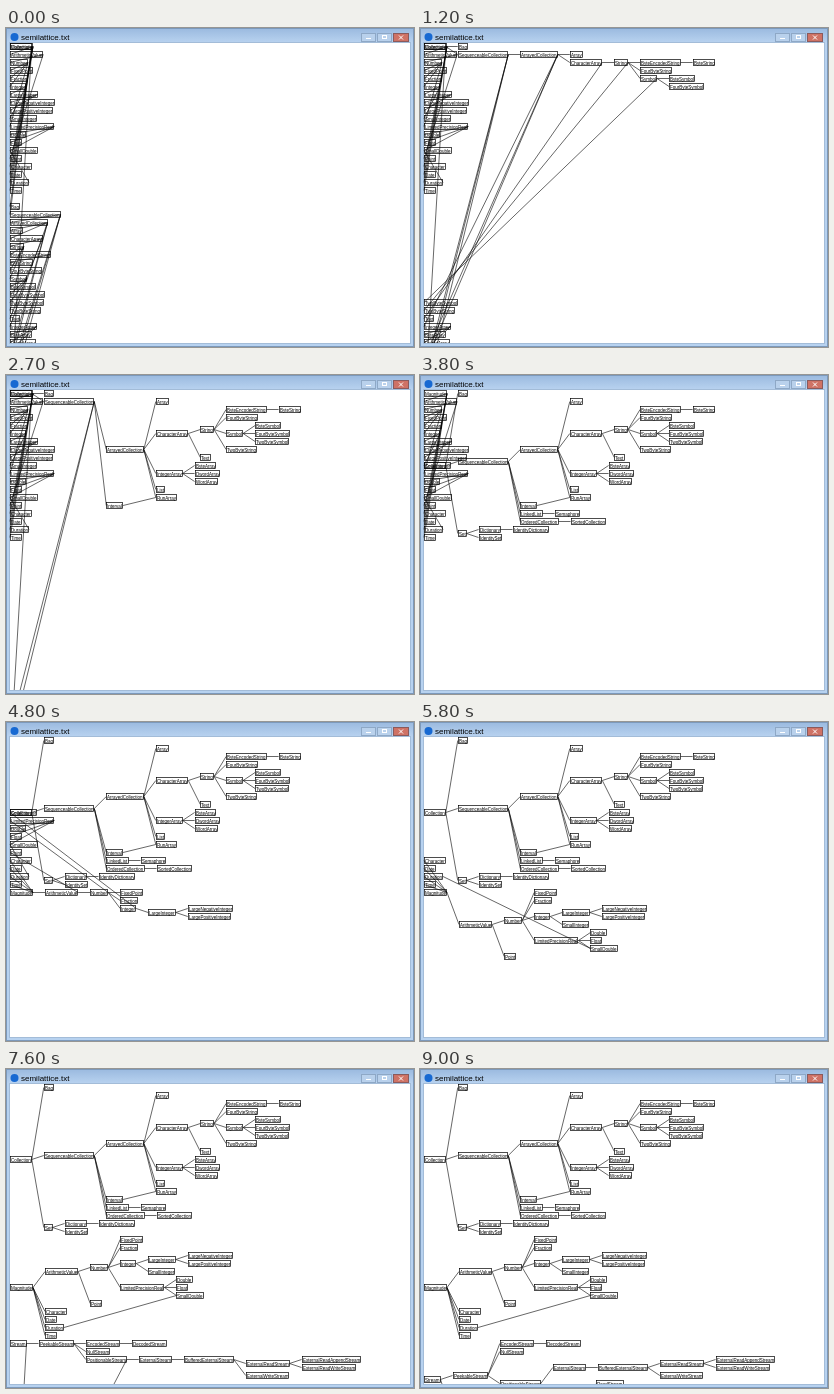
An HTML page with a canvas that plays this animation: 408 by 319 pixels, repeating every 9200 ms.

```html
<!DOCTYPE html>
<html lang="en">
<head>
<meta charset="utf-8">
<title>semilattice.txt</title>
<style>
html, body { margin: 0; width: 100%; height: 100%; overflow: hidden; background: #fff; }
canvas { display: block; }
</style>
</head>
<body>
<canvas id="stage" width="408" height="319"></canvas>
<script>
const STEP = 100, LOOP = 9200, ROW = 8, GAP = 12, LEFT = 4, TOP = 18.5;
const TEXT_X = 0.045, TEXT_Y = 0.055; // condensed label scale for the 100px font
const LABEL_FONT = '100px "Liberation Sans", Arial, sans-serif';

const outline = `
Magnitude
 ArithmeticValue
  Number
   FixedPoint
   Fraction
   Integer
    LargeInteger
     LargeNegativeInteger
     LargePositiveInteger
    SmallInteger
   LimitedPrecisionReal
    Double
    Float
    SmallDouble
  Point
 Character
 Date
 Duration
 Time
Collection
 Bag
 SequenceableCollection
  ArrayedCollection
   Array
   CharacterArray
    String
     ByteEncodedString
      ByteString
     FourByteString
     Symbol
      ByteSymbol
      FourByteSymbol
      TwoByteSymbol
     TwoByteString
    Text
   IntegerArray
    ByteArray
    DwordArray
    WordArray
   List
   RunArray
  Interval
  LinkedList
   Semaphore
  OrderedCollection
   SortedCollection
 Set
  Dictionary
   IdentityDictionary
  IdentitySet
Stream
 PeekableStream
  EncodedStream
   DecodedStream
  NullStream
  PositionableStream
   ExternalStream
    BufferedExternalStream
     ExternalReadStream
      ExternalReadAppendStream
      ExternalReadWriteStream
     ExternalWriteStream
   InternalStream
    ReadStream
    WriteStream
     ByteCodeStream
     ReadWriteStream
     TextStream
 Random`;

const ctx = document.getElementById('stage').getContext('2d');
const nodes = [], roots = [], edges = [], moves = [];

function parse() {
  ctx.font = LABEL_FONT;
  const path = [];
  for (const line of outline.trim().split('\n')) {
    const name = line.trim(), depth = line.length - name.length;
    const node = { name, kids: [], w: ctx.measureText(name).width * TEXT_X + 2 };
    nodes.push(node);
    path[depth] = node;
    if (depth) {
      path[depth - 1].kids.push(node);
      edges.push([path[depth - 1], node]);
    } else roots.push(node);
  }
  const find = name => nodes.find(n => n.name === name);
  edges.push([find('Interval'), find('RunArray')], [find('Duration'), find('SmallDouble')]);
}

// Depth-first layout: place a node, then its kids, then centre it on its rows.
let row = TOP;
function place(node, x) {
  const top = row;
  moves.push([node, x, top]);
  node.kids.forEach((kid, i) => {
    if (i) row += ROW;
    place(kid, x + node.w + GAP);
  });
  if (row > top) moves.push([node, x, (top + row) / 2]);
}

function box(x, y, w, h, fill, stroke) {
  ctx.fillStyle = fill;
  ctx.fillRect(x, y, w, h);
  if (!stroke) return;
  ctx.strokeStyle = stroke;
  ctx.lineWidth = 1;
  ctx.strokeRect(x + 0.5, y + 0.5, w - 1, h - 1);
}

function drawWindow() {
  box(0, 0, 408, 319, '#b7d2f0', '#7c99bb');
  const bar = ctx.createLinearGradient(0, 1, 0, 15);
  bar.addColorStop(0, '#9cbbe0');
  bar.addColorStop(1, '#b9d3f0');
  box(1, 1, 406, 14, bar);
  box(3, 14, 402, 302, '#a3bcd8');
  box(4, 15, 400, 300, '#fff');

  ctx.fillStyle = '#1769d2';
  ctx.beginPath();
  ctx.arc(8.5, 9, 4, 0, 7);
  ctx.fill();
  ctx.fillStyle = '#000';
  ctx.font = '8px "Liberation Sans", Arial, sans-serif';
  ctx.fillText('semilattice.txt', 15, 12);

  box(355, 5, 15, 9, '#b9d1ec', '#8ea8c6');
  box(371, 5, 15, 9, '#b9d1ec', '#8ea8c6');
  box(387, 5, 16, 9, '#cf7265', '#8a5a5c');
  box(360, 10, 5, 1, '#fff');
  ctx.strokeStyle = '#fff';
  ctx.strokeRect(376.5, 7.5, 4, 3);
  ctx.beginPath();
  ctx.moveTo(393, 7.5);
  ctx.lineTo(397, 11.5);
  ctx.moveTo(397, 7.5);
  ctx.lineTo(393, 11.5);
  ctx.stroke();
}

function drawNode({ name, x, y, w }) {
  const left = Math.round(x);
  ctx.strokeRect(left + 0.5, y - 3, Math.round(x + w) - left - 1, 6);
  ctx.save();
  ctx.translate(left + 1, y + 2);
  ctx.scale(TEXT_X, TEXT_Y);
  ctx.fillText(name, 0, 0);
  ctx.restore();
}

function draw(step) {
  nodes.forEach((n, i) => { n.x = LEFT; n.y = TOP + i * ROW; });
  for (const [node, x, y] of moves.slice(0, step + 1)) Object.assign(node, { x, y });

  drawWindow();
  ctx.save();
  ctx.beginPath();
  ctx.rect(3, 15, 402, 300);
  ctx.clip();
  ctx.strokeStyle = ctx.fillStyle = '#000';
  ctx.font = LABEL_FONT;
  ctx.lineWidth = 0.6;
  ctx.beginPath();
  for (const [a, b] of edges) {
    ctx.moveTo(a.x + a.w, a.y);
    ctx.lineTo(b.x, b.y);
  }
  ctx.stroke();
  ctx.lineWidth = 0.7;
  nodes.forEach(drawNode);
  ctx.restore();
}

parse();
[...roots].sort((a, b) => a.name < b.name ? -1 : 1).forEach((root, i) => {
  if (i) row += ROW;
  place(root, LEFT);
});

const start = performance.now();
let shown = -1;
function tick() {
  const step = Math.floor((performance.now() - start) % LOOP / STEP);
  if (step !== shown) draw(shown = step);
  requestAnimationFrame(tick);
}
tick();
</script>
</body>
</html>
```
